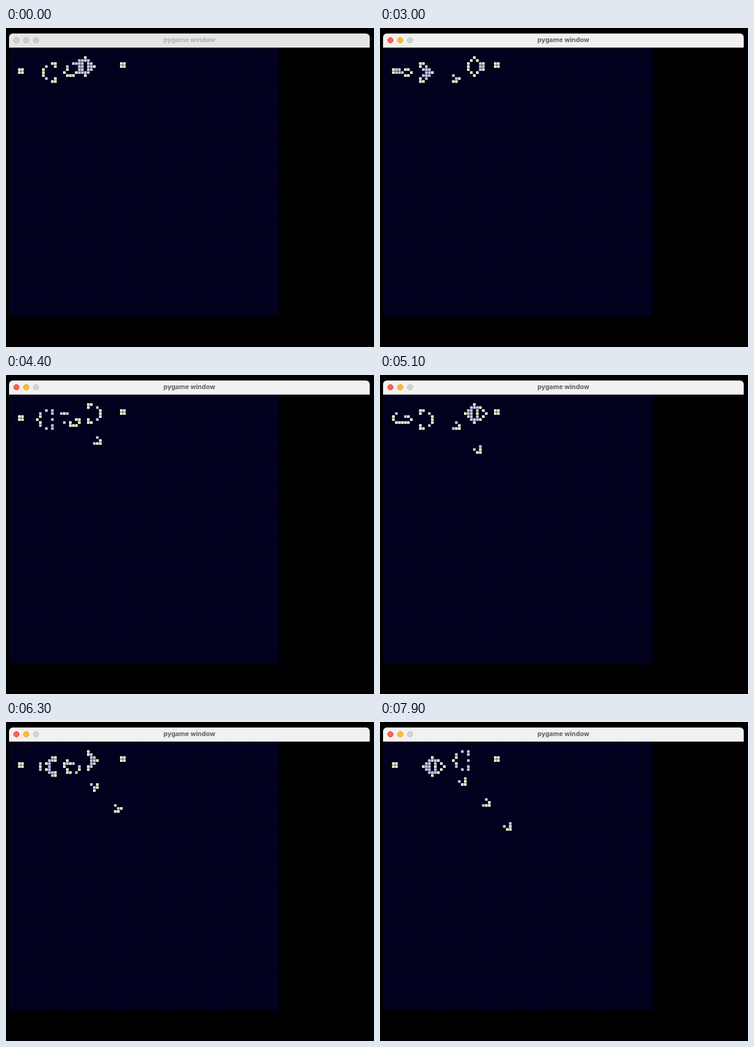
Animation, 600 px wide and 521 px high, one loop 8 s. Source, as an HTML page with a canvas:

```html
<!DOCTYPE html>
<html lang="en">
<head>
<meta charset="utf-8">
<title>Glider gun</title>
<style>
  html, body { margin: 0; width: 100%; height: 100%; overflow: hidden; background: #000; }
  #stage { position: relative; width: 600px; height: 521px; overflow: hidden; background: #000; }
  canvas { position: absolute; left: 0; top: 0; }
  #bar {
    position: absolute; left: 5px; top: 9px; width: 588px; height: 22.5px;
    border-radius: 6px 6px 0 0; background: #e6e4e6; color: #b0aeb0;
    font: 700 10.6px/22px Inter, "Open Sans", sans-serif; text-align: center;
  }
  #bar i {
    position: absolute; top: 6px; width: 10px; height: 10px; box-sizing: border-box;
    border-radius: 50%; background: #cdcbcd; border: .5px solid #bdbbbd;
  }
  #bar i:nth-of-type(1) { left: 7px; }
  #bar i:nth-of-type(2) { left: 23px; }
  #bar i:nth-of-type(3) { left: 39px; }
  #bar.active { background: #f2f1f2; color: #5e5d5f; }
  #bar.active i { background: #d3d2d4; border-color: #c4c3c5; }
  #bar.active i:nth-of-type(1) { background: #ff5f57; border-color: #e8524a; }
  #bar.active i:nth-of-type(2) { background: #febc2e; border-color: #e5a426; }
</style>
</head>
<body>
<div id="stage">
  <canvas id="view" width="600" height="521"></canvas>
  <div id="bar"><i></i><i></i><i></i>pygame window</div>
</div>
<script>
const LOOP = 8000, TICK = 100;
const FOCUS = 1700, FULL_SPEED = 3000;
const N = 90, PITCH = 440 / N, SIZE = PITCH * 7 / 8;
const LEFT = 5, TOP = 31.5, MARGIN = 3;
const FIRST_GEN = 4, LAST_GEN = 90;
const GUN = '24bo$22bobo$12b2o6b2o12b2o$11bo3bo4b2o12b2o$2o8bo5bo3b2o$' +
            '2o8bo3bob2o4bobo$10bo5bo7bo$11bo3bo$12b2o!';

const bar = document.getElementById('bar');
const ctx = document.getElementById('view').getContext('2d');

// Run-length pattern -> set of cell keys (row * N + column)
function parse(rle) {
  const cells = new Set();
  let x = MARGIN, y = MARGIN;
  for (const [, count, tag] of rle.matchAll(/(\d*)([bo$])/g)) {
    const n = +count || 1;
    if (tag === '$') { y += n; x = MARGIN; continue; }
    if (tag === 'o') for (let i = 0; i < n; i++) cells.add(y * N + x + i);
    x += n;
  }
  return cells;
}

function evolve(cells) {
  const near = new Map();
  for (const k of cells)
    for (const dy of [-N, 0, N])
      for (const dx of [-1, 0, 1])
        if (dx || dy) near.set(k + dx + dy, (near.get(k + dx + dy) || 0) + 1);
  const next = new Set();
  for (const [k, n] of near) if (n === 3 || (n === 2 && cells.has(k))) next.add(k);
  return next;
}

const gens = [parse(GUN)];
while (gens.length <= LAST_GEN) gens.push(evolve(gens[gens.length - 1]));

function genAt(t) {
  if (t < FOCUS) return FIRST_GEN;
  if (t < FULL_SPEED) return FIRST_GEN + Math.floor((t - FOCUS) * 14 / (FULL_SPEED - FOCUS));
  return Math.floor(18.75 + (t - FULL_SPEED) * 0.0145);
}

function cell(x, y, color) {
  ctx.fillStyle = color;
  ctx.fillRect(LEFT + x * PITCH, TOP + y * PITCH, SIZE, SIZE);
}

function draw(t) {
  const g = genAt(t), now = gens[g], next = gens[g + 1];
  ctx.clearRect(0, 0, 600, 521);
  ctx.save();
  ctx.beginPath();
  ctx.roundRect(LEFT, TOP, 440, 440, [0, 0, 0, 5]);
  ctx.clip();
  ctx.fillStyle = 'rgb(0,0,12)';
  ctx.fillRect(LEFT, TOP, 440, 440);
  for (let y = 0; y < N; y++)
    for (let x = 0; x < N; x++) {
      const k = y * N + x;
      cell(x, y, !now.has(k) ? 'rgb(2,2,37)' : next.has(k) ? 'rgb(255,255,215)' : 'rgb(200,200,225)');
    }
  ctx.restore();
  bar.classList.toggle('active', t >= FOCUS);
}

const start = performance.now();
let shown = -1;
function frame() {
  const t = Math.floor(((performance.now() - start) % LOOP) / TICK) * TICK;
  if (t !== shown) draw(shown = t);
  requestAnimationFrame(frame);
}
frame();
</script>
</body>
</html>
```
